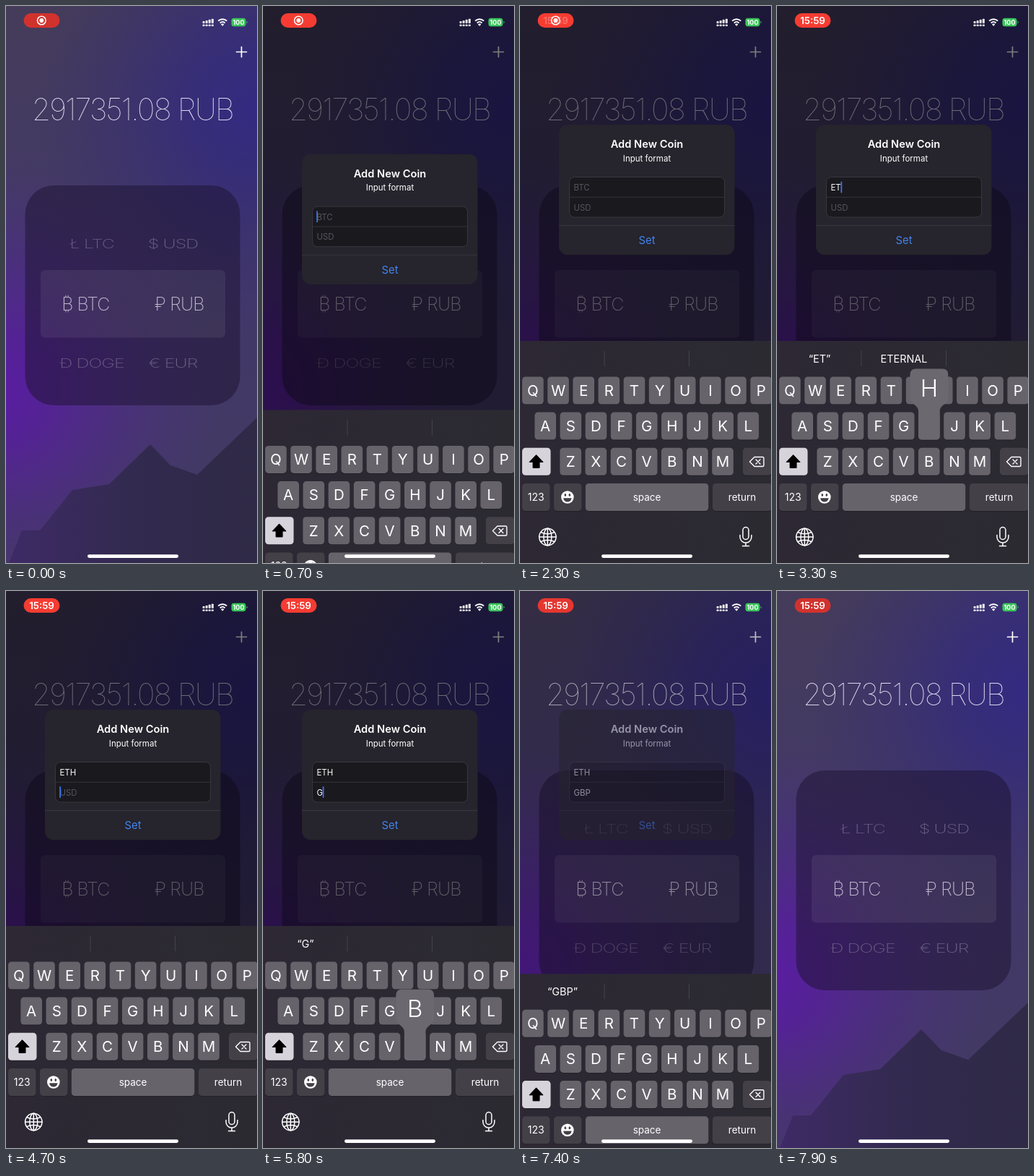
Write an HTML page that moves like this. It is 348 px wide and 770 px high and loops after 8000 ms.

```html
<!DOCTYPE html>
<html lang="en">
<head>
<meta charset="utf-8">
<title>Add New Coin</title>
<style>
  html, body { margin: 0; width: 100%; height: 100%; overflow: hidden; background: #2b2933; }
  svg { display: block; width: 100vw; height: 100vh; }
  text { font-family: Inter, Roboto, "Noto Sans", sans-serif; fill: #fff; }
  .mid { text-anchor: middle; }
  .line { fill: none; stroke: #fff; stroke-linecap: round; stroke-linejoin: round; }
</style>
</head>
<body>
<svg viewBox="0 0 348 770" preserveAspectRatio="none">
  <defs>
    <linearGradient id="base" x1="0" y1="0" x2="0" y2="1">
      <stop offset="0" stop-color="#453c5a"/>
      <stop offset=".5" stop-color="#42386a"/>
      <stop offset="1" stop-color="#423a60"/>
    </linearGradient>
    <radialGradient id="violet" gradientUnits="userSpaceOnUse" cx="-20" cy="530" r="320">
      <stop offset="0" stop-color="#5a1ca4"/>
      <stop offset=".25" stop-color="#571f9c" stop-opacity=".85"/>
      <stop offset="1" stop-color="#4c3280" stop-opacity="0"/>
    </radialGradient>
    <radialGradient id="blue" gradientUnits="userSpaceOnUse" cx="350" cy="140" r="310">
      <stop offset="0" stop-color="#332a82"/>
      <stop offset=".35" stop-color="#352c7a" stop-opacity=".85"/>
      <stop offset="1" stop-color="#3a306c" stop-opacity="0"/>
    </radialGradient>
    <linearGradient id="rock" x1="0" y1="0" x2="1" y2="0">
      <stop offset="0" stop-color="#3e2a66"/>
      <stop offset=".5" stop-color="#322a4f"/>
      <stop offset="1" stop-color="#2f2a46"/>
    </linearGradient>
    <linearGradient id="board" x1="0" y1="0" x2="1" y2="0">
      <stop offset="0" stop-color="#2d2834"/>
      <stop offset="1" stop-color="#2b2a31"/>
    </linearGradient>
  </defs>

  <rect width="348" height="770" fill="url(#base)"/>
  <rect width="348" height="770" fill="url(#blue)"/>
  <rect width="348" height="770" fill="url(#violet)"/>
  <path d="M4 770 22 725H47L92 669 143 661 200 606 228 635 265 648 348 569V770Z" fill="url(#rock)"/>
  <rect x="26.500" y="248" width="298" height="304" rx="40" fill="#1c1230" fill-opacity=".5"/>
  <rect x="48" y="365" width="256" height="93.500" rx="6" fill="#fff" fill-opacity=".065"/>
  <text class="mid" x="175.500" y="158" font-size="42" font-weight="100" letter-spacing="-1.9" style="fill:#e6e0f4">2917351.08 RUB</text>
  <g id="picker"></g>
  <path class="line" d="M319.500 63.500h14M326.500 56.500v14" stroke-width="1.7"/>

  <rect id="dim" width="348" height="770" fill="#000"/>

  <g id="alert">
    <rect x="54" y="164" width="243.500" height="180" rx="12" fill="#26242c"/>
    <text class="mid" x="176" y="196" font-size="14.700" font-weight="600">Add New Coin</text>
    <text class="mid" x="176" y="214.500" font-size="11.500">Input format</text>
    <rect x="68.500" y="236.500" width="215" height="55.500" rx="7" fill="#1a191e" stroke="#403e46" stroke-width=".8"/>
    <path d="M69 264.300H283M54 303.500H297.500" stroke="#3d3b43" stroke-width=".8"/>
    <text id="coin" x="74.500" y="255" font-size="11.400"></text>
    <text id="currency" x="74.500" y="282.700" font-size="11.400"></text>
    <rect id="caret" width="1.800" height="16" rx=".9" fill="#4272e6"/>
    <text class="mid" x="176" y="329.300" font-size="14.800" style="fill:#4284ee">Set</text>
  </g>

  <g id="keyboard">
    <rect y="463" width="348" height="330" fill="url(#board)"/>
    <path d="M117 476.500V498M234.500 476.500V498" stroke="#45424a"/>
    <text class="mid" id="hint1" x="59" y="492.500" font-size="14.400"></text>
    <text class="mid" id="hint2" x="176" y="492.500" font-size="14.400"></text>
    <g id="keys"></g>
    <path d="M22.500 620.500 32 630.500H27V638.500H18V630.500H13Z" fill="#000" stroke="#000" stroke-linejoin="round"/>
    <g class="line" stroke-width="1.400">
      <path d="M325 623.500H336.500a1.500 1.500 0 0 1 1.500 1.500V635a1.500 1.500 0 0 1-1.500 1.500H325L318.500 630Z"/>
      <path d="M327 627l6 6M333 627l-6 6"/>
    </g>
    <circle cx="65.800" cy="679" r="8.800" fill="#fff"/>
    <g fill="#434048">
      <ellipse cx="62.800" cy="676" rx="1.300" ry="2"/><ellipse cx="68.800" cy="676" rx="1.300" ry="2"/>
      <path d="M60 680.300H71.600Q70.500 685.500 65.800 685.500T60 680.300Z"/>
    </g>
    <g class="line" stroke-width="1.500">
      <circle cx="38.300" cy="734" r="11.700"/>
      <ellipse cx="38.300" cy="734" rx="5.500" ry="11.700"/>
      <path d="M26.600 734H50M38.300 722.300V745.700M29 727.500Q38.300 732 47.600 727.500M29 740.500Q38.300 736 47.600 740.500"/>
      <rect x="309" y="720.500" width="8" height="17" rx="4"/>
      <path d="M305 731.500V734a8 8 0 0 0 16 0V731.500M313 742V746.500M308.500 746.500H317.500"/>
    </g>
    <g id="popup">
      <path fill="#6b6870"/>
      <text class="mid" font-size="33" font-weight="300"></text>
    </g>
  </g>

  <rect id="pill" x="24.500" y="10" width="50" height="20" rx="10"/>
  <g id="record">
    <circle class="line" cx="49.300" cy="20" r="5.800" stroke-width="1.500"/>
    <circle cx="49.300" cy="20" r="2.900" fill="#fff"/>
  </g>
  <text class="mid" id="clock" x="49.500" y="24.800" font-size="13.300" font-weight="600">15:59</text>
  <g id="signal" fill="#fff"></g>
  <path class="line" d="M294.200 20.600a8.600 8.600 0 0 1 12 0M296.800 23.400a5 5 0 0 1 6.800 0" stroke-width="2" style="stroke-linecap:butt"/>
  <path d="M298 25.200a3.200 3.200 0 0 1 4.400 0L300.200 27.800Z" fill="#fff"/>
  <rect x="312.500" y="16.800" width="20" height="11.400" rx="3.400" fill="#3ac45a"/>
  <path d="M333.600 20.700a2 2 0 0 1 0 3.600Z" fill="#3ac45a"/>
  <text class="mid" x="322.500" y="26" font-size="9" font-weight="700">100</text>
  <rect x="113" y="758.200" width="126" height="4.800" rx="2.400" fill="#fff"/>
</svg>

<script>
const LOOP = 8000, STEP = 100;
const KEYBOARD_RISE = 307, ALERT_RISE = 131;
const KEY_W = 29.7, KEY_H = 38, PITCH = 35.15;
const HINT_DELAY = 150;

const $ = id => document.getElementById(id);
const clamp = v => Math.min(1, Math.max(0, v));
const ramp = (t, from, to) => clamp((t - from) / (to - from));
const easeOut = p => 1 - (1 - p) ** 3;
const easeInOut = p => p * p * (3 - 2 * p);
const mix = (a, b, p) => Math.round(a + (b - a) * p);

function add(parent, tag, attrs, content = "") {
  const el = document.createElementNS("http://www.w3.org/2000/svg", tag);
  for (const name in attrs) el.setAttribute(name, attrs[name]);
  el.textContent = content;
  return parent.appendChild(el);
}

function wheelLabel(label, x, y, squash, color) {
  add($("picker"), "text", {
    class: "mid", "font-size": 25, "font-weight": 200, "letter-spacing": -0.9, style: `fill:${color}`,
    transform: `translate(${x} ${y}) scale(1 ${squash})`, y: 9
  }, label);
}
wheelLabel("Ł LTC", 119, 329, 0.7, "#6c5b83");
wheelLabel("$ USD", 231.5, 329, 0.7, "#6c6285");
wheelLabel("₿ BTC", 110.4, 412, 1, "#bdb4ca");
wheelLabel("₽ RUB", 240.2, 412, 1, "#bdb4ca");
wheelLabel("Ð DOGE", 119, 494, 0.7, "#6c5b83");
wheelLabel("€ EUR", 231.5, 494, 0.7, "#6c6285");

for (let i = 0; i < 4; i++) {
  const x = 272.6 + i * 4.1, h = 3 + i * 1.1;
  add($("signal"), "rect", { x, y: 24 - h, width: 2.9, height: h, rx: 0.8 });
  add($("signal"), "rect", { x, y: 25.4, width: 2.9, height: 2.7, rx: 0.8 });
}

function drawKey(x, y, w, fill, label, size) {
  add($("keys"), "rect", { x, y: y + 0.8, width: w, height: KEY_H, rx: 4.6, fill: "#1f1d23" });
  add($("keys"), "rect", { x, y, width: w, height: KEY_H, rx: 4.6, fill });
  if (label) add($("keys"), "text", {
    class: "mid", x: x + w / 2, y: y + 19 + size * 0.36, "font-size": size
  }, label);
}

const LIGHT = "#66636b", DARK = "#434048";
const keyPos = {};
[["QWERTYUIOP", 3, 512.5], ["ASDFGHJKL", 20.3, 561.6], ["ZXCVBNM", 55.3, 610.8]].forEach(([row, x0, y]) =>
  [...row].forEach((letter, i) => {
    const x = x0 + i * PITCH;
    keyPos[letter] = { x, y };
    drawKey(x, y, KEY_W, LIGHT, letter, 20.5);
  }));
drawKey(3, 610.8, 39.5, "#d6d3db");
drawKey(309, 610.8, 39.5, DARK);
drawKey(3, 660, 38.5, DARK, "123", 14);
drawKey(47, 660, 38.5, DARK);
drawKey(90.8, 660, 170.5, LIGHT, "space", 13.5);
drawKey(267, 660, 82, DARK, "return", 13.5);

// Letters commit when the finger lifts.
const presses = [
  { key: "E", down: 2550, up: 2700, field: "coin", hints: ["“E”", ""] },
  { key: "T", down: 2900, up: 3050, field: "coin", hints: ["“ET”", "ETERNAL"] },
  { key: "H", down: 3250, up: 3400, field: "coin", hints: ["“ETH”", ""] },
  { key: "G", down: 5200, up: 5350, field: "currency", hints: ["“G”", ""] },
  { key: "B", down: 5800, up: 5950, field: "currency", hints: ["“GB”", ""] },
  { key: "P", down: 6450, up: 6600, field: "currency", hints: ["“GBP”", ""] }
];
const FIELD_SWITCH = 4400;

function showPopup(press) {
  $("popup").style.display = press ? "" : "none";
  if (!press) return;
  const { x, y } = keyPos[press.key];
  const atEdge = press.key === "P", left = atEdge ? 20 : 11.5, right = atEdge ? 0 : 11.5;
  const [shape, letter] = $("popup").children;
  shape.setAttribute("d",
    `M${x - left + 8} ${y - 60}H${x + KEY_W + right - 8}q8 0 8 8V${y - 20}` +
    `c0 10 ${-right} 9 ${-right} 19V${y + KEY_H - 5}q0 5-5 5H${x + 5}q-5 0-5-5V${y - 1}` +
    `c0-10 ${-left} -9 ${-left} -19V${y - 52}q0-8 8-8Z`);
  letter.textContent = press.key;
  letter.setAttribute("x", x + (KEY_W + right - left) / 2);
  letter.setAttribute("y", y - 21.6);
}

function fillField(id, placeholder, t) {
  const typed = presses.filter(p => p.field === id && t >= p.up).map(p => p.key).join("");
  const el = $(id);
  el.textContent = typed || placeholder;
  el.style.fill = typed ? "#fff" : "#57555c";
  return typed ? el.getComputedTextLength() : 0;
}

function drawForm(t) {
  const widths = { coin: fillField("coin", "BTC", t), currency: fillField("currency", "USD", t) };
  const active = t < FIELD_SWITCH ? "coin" : "currency";
  const touched = presses.filter(p => t >= p.down).pop();
  const focusTime = active === "coin" ? 700 : FIELD_SWITCH;
  const since = t - Math.max(focusTime, touched ? touched.up : 0);
  const caret = $("caret");
  caret.setAttribute("x", 74.2 + widths[active]);
  caret.setAttribute("y", active === "coin" ? 242.5 : 270);
  caret.style.opacity = since < 0 || since % 1000 < 500 ? 1 : 0;

  const hinted = presses.filter(p => p.field === active && t >= p.up + HINT_DELAY).pop();
  const hints = hinted ? hinted.hints : ["", ""];
  $("hint1").textContent = hints[0];
  $("hint2").textContent = hints[1];
  showPopup(presses.find(p => t >= p.down && t < p.up));
}

function render(t) {
  const shown = easeInOut(ramp(t, 350, 650)) * (1 - easeInOut(ramp(t, 7250, 7550)));
  const rise = easeOut(ramp(t, 500, 1120)) * (1 - easeInOut(ramp(t, 7250, 7750)));
  const opening = t < LOOP / 2;
  const scale = opening ? 1.12 - 0.12 * shown : 1;
  const alertDrop = opening ? (1 - rise) * ALERT_RISE : 0;

  $("dim").setAttribute("opacity", 0.5 * shown);
  $("alert").setAttribute("opacity", shown);
  $("alert").setAttribute("transform",
    `translate(176 ${254 + alertDrop}) scale(${scale}) translate(-176 -254)`);
  $("keyboard").setAttribute("transform", `translate(0 ${(1 - rise) * KEYBOARD_RISE})`);
  $("keyboard").style.display = rise > 0 ? "" : "none";
  drawForm(t);

  $("pill").setAttribute("fill", `rgb(${mix(210, 246, shown)},${mix(50, 60, shown)},${mix(45, 50, shown)})`);
  $("record").setAttribute("opacity", 1 - ramp(t, 2300, 2500));
  $("clock").setAttribute("opacity", ramp(t, 2240, 2460));
}

const start = performance.now();
function tick(now) {
  const t = Math.max(0, now - start) % LOOP;
  render(Math.floor(t / STEP) * STEP);
  requestAnimationFrame(tick);
}
render(0);
requestAnimationFrame(tick);
</script>
</body>
</html>
```
